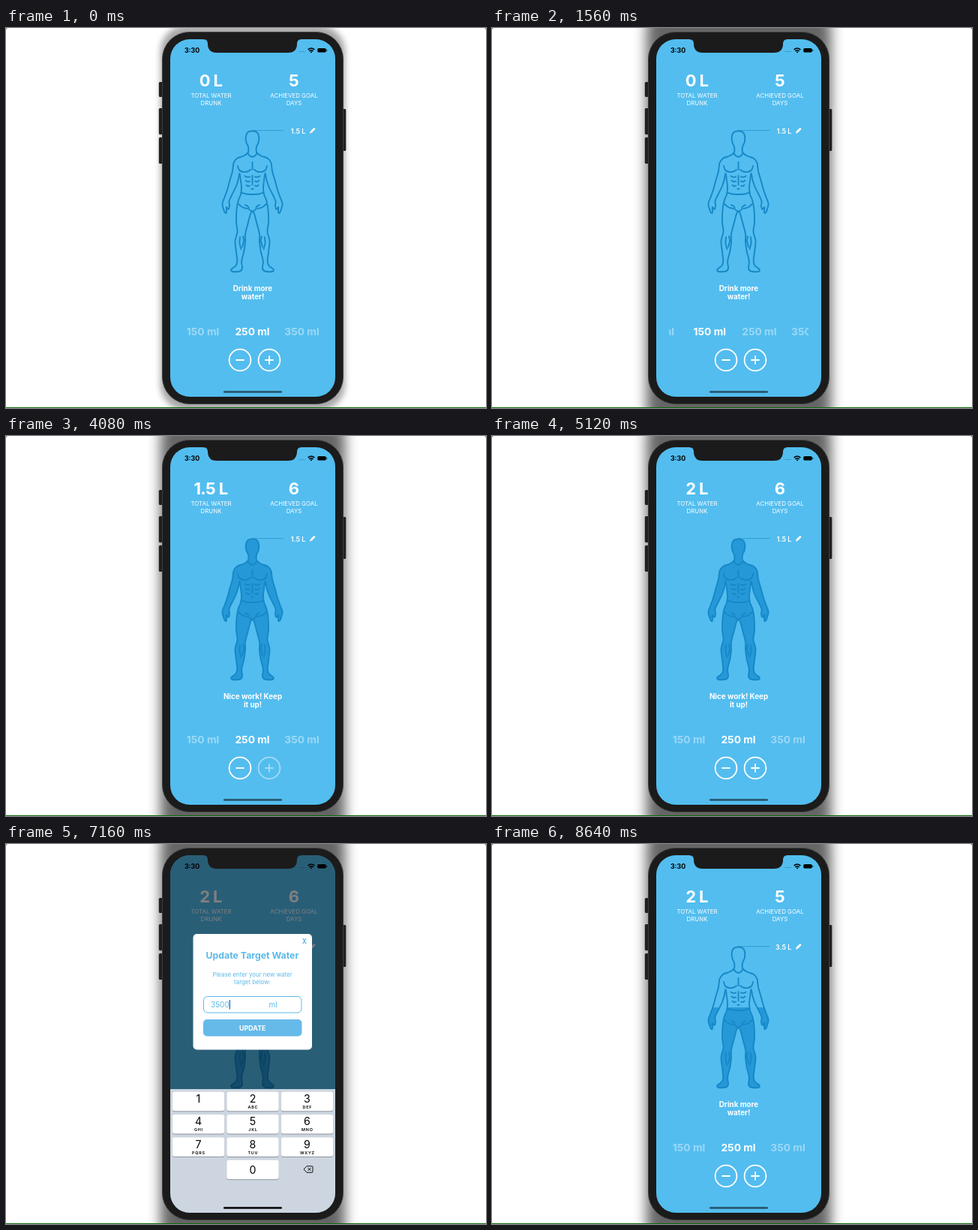
An HTML page that plays this animation: 640 px wide and 507 px high, repeating every 8.68 s.

```html
<!DOCTYPE html>
<html lang="en">
<head>
<meta charset="utf-8">
<title>Water tracker</title>
<style>
  html, body { margin: 0; height: 100%; overflow: hidden; background: #fff; }
  svg { display: block; width: 100vw; height: 100vh; }
  text { font-family: Inter, Roboto, sans-serif; text-anchor: middle; white-space: pre; }
</style>
</head>
<body>
<svg id="stage" viewBox="0 0 640 507"></svg>
<script>
const LOOP = 8680, BLUE = '#53bdef', INK = '#1688c6', SKY = '#5cb9e8';
const AXIS = 328.5, HEAD_Y = 137, FOOT_Y = 326;
const TAPS = Array.from({ length: 8 }, (_, i) => 2300 + 330 * i);
const UPDATE = 7500;
const TYPED = [6200, 6450, 6700, 6950];

const clamp = v => Math.max(0, Math.min(1, v));
const ramp = (t, start, length) => clamp((t - start) / length);
const smooth = u => u * u * (3 - 2 * u);
const easeOut = u => 1 - (1 - u) ** 2;
const dip = (t, start, end) => 1 - .8 * ramp(t, start, 60) * (1 - ramp(t, end, 90));

const label = (x, y, size, str, weight = 400, more = '') =>
  `<text x="${x}" y="${y}" font-size="${size}" font-weight="${weight}" ${more}>${str}</text>`;
const box = (x, y, w, h, r, fill, more = '') =>
  `<rect x="${x}" y="${y}" width="${w}" height="${h}" rx="${r}" fill="${fill}" ${more}/>`;

// Smooth curve through points written as "x,y x,y ..."
const parse = str => str.split(' ').map(p => p.split(',').map(Number));
function curve(pts) {
  let d = `M${pts[0]}`;
  for (let i = 0; i < pts.length - 1; i++) {
    const a = pts[i - 1] || pts[i], b = pts[i], c = pts[i + 1], e = pts[i + 2] || c;
    const k = j => [b[j] + (c[j] - a[j]) / 6, c[j] - (e[j] - b[j]) / 6];
    const [x1, x2] = k(0), [y1, y2] = k(1);
    d += `C${x1} ${y1} ${x2} ${y2} ${c}`;
  }
  return d;
}

const half = parse('328.5,137.3 322.5,139 319.8,145 320.5,153 323,158.5 322.8,166 317,170.5 308,174 ' +
  '303.5,180 302,191 298.5,203 295,216 291,227 288.5,234 289.5,240 292,246.5 294,246 293.8,239 296.5,242 ' +
  '298,237 297.5,231 301,223 306.5,212 309.5,203 311.5,194 313,204 314,213 313,222 309.5,231 ' +
  '307.5,243 307,259 308.5,272 305.5,284 307,299 308.3,311 306.5,317 300.5,322 302,325 ' +
  '312,324.5 315,320.5 314.2,311 317.5,297 319,285 319,275 322.5,261 326,248 328.5,245');
const mirrored = half.slice(0, -1).reverse().map(([x, y]) => [2 * AXIS - x, y]);
const outline = curve(half.concat(mirrored));

const details = [
  '322.5,167 325,170.5 328.5,172',
  '309,184 311,189.5 316,192 322,191.5 326,189',
  '318.5,197.5 321,198.8 325,198.5',
  '319.5,203.5 322,205 325,204.5',
  '320.5,209.5 322.5,211 325,210.5',
  '313.5,219.5 320,221.5 328.5,222',
  '309,234 315,239 321.5,241',
  '319,236 323,238.5 324,242 328.5,245',
  '312,279 311.5,287 313.5,295',
  '316,278 317,284 315,292'
].map(s => `<path d="${curve(parse(s))}"/>`).join('');

const figure = `
  <path d="${outline}" fill="#2598d8" clip-path="url(#level)"/>
  <g fill="none" stroke="${INK}" stroke-width="1.9" stroke-linecap="round" stroke-linejoin="round">
    <path d="${outline}"/>
    <g id="marks">${details}</g>
    <use href="#marks" transform="translate(${2 * AXIS}) scale(-1 1)"/>
    <path d="M328.5 179V189M328.5 197V209M327.5 214.8H329.5"/>
  </g>`;

const letters = ['', 'ABC', 'DEF', 'GHI', 'JKL', 'MNO', 'PQRS', 'TUV', 'WXYZ'];
function key(digit, col, row) {
  const x = 221.8 + 72.5 * col, y = 330.8 + 30.3 * row, mid = x + 34.7;
  return box(x, y + 1, 69.4, 25.5, 3, '#8d949d') + box(x, y, 69.4, 25.5, 3, '#fff') +
    label(mid, y + (digit ? 14.3 : 17.8), 14.2, digit) +
    (digit > 1 ? label(mid + .4, y + 22.3, 5.4, letters[digit - 1], 600, 'letter-spacing=".8"') : '');
}
const keyboard = box(219, 327, 220, 200, 0, '#cdd6e0') +
  letters.map((_, i) => key(i + 1, i % 3, Math.floor(i / 3))).join('') + key(0, 1, 3) +
  `<path d="M397 434L401 429.8H408Q409 429.8 409 431V437Q409 438.3 408 438.3H401ZM402.5 432L406.5 436M406.5 432L402.5 436"
    fill="none" stroke="#111" stroke-width="1"/>`;

const modal = box(249.5, 120, 158.5, 154.5, 5, '#fff') + `<g fill="${SKY}">` +
  label(398, 133.2, 8.6, 'X', 700) +
  label(328.5, 153, 12.3, 'Update Target Water', 700) +
  label(328.5, 177.2, 7.9, 'Please enter your new water') +
  label(328.5, 187.2, 7.9, 'target below:') +
  box(263.5, 203.5, 130.5, 21.5, 5, 'none', `stroke="${SKY}"`) +
  label(273, 218, 10, '', 400, 'id="field" style="text-anchor:start"') +
  label(356, 218, 10, 'ml') + '</g>' +
  box(273, 208, 1.3, 12.5, 0, '#3c5fce', 'id="caret"') +
  `<g id="update">${box(263, 234, 131.5, 22.5, 5, '#66bae9')}
    ${label(328.8, 248.5, 8.9, 'UPDATE', 700, 'fill="#fff"')}</g>`;

const big = 'letter-spacing="-.6"';
const choices = [50, 150, 250, 350, 450].map((ml, i) =>
  label(AXIS + 66 * (i - 2), 409.6, 13.8, ml + ' ml', 700, 'class="choice"')).join('');

const app = box(219, 15, 220, 477, 0, BLUE) + `<g fill="#fff">` +
  label(273, 77.8, 22, '', 700, `id="total" ${big}`) +
  label(383.5, 77.8, 22, '', 700, `id="days" ${big}`) +
  label(273.5, 93.2, 7.9, 'TOTAL WATER') + label(273.5, 103, 7.9, 'DRUNK') +
  label(384, 93.2, 7.9, 'ACHIEVED GOAL') + label(384, 103, 7.9, 'DAYS') +
  label(399.3, 140.6, 9, '', 600, 'id="goal" style="text-anchor:end"') +
  `<path id="pencil" d="M404.8 140.8L406 137.6L410.2 133.4Q411.3 132.8 412.2 134.2L412.4 135L408 139.4Z"/>` +
  label(329, 350.5, 9.8, '', 700, 'id="line1"') + label(329, 362, 9.8, '', 700, 'id="line2"') +
  `<g clip-path="url(#picker)"><g id="strip">${choices}</g></g></g>
  <path d="M328 136.7H370" stroke="#2d9ad2" stroke-width=".9"/>${figure}
  <g fill="none" stroke="#fff" stroke-width="1.8">
    <circle cx="312" cy="443" r="14.4"/><path d="M306.3 443H317.7"/>
    <g id="plus"><circle cx="351" cy="443" r="14.4"/><path d="M345.3 443H356.7M351 437.3V448.7"/></g>
  </g>`;

const status = label(248, 33, 8.8, '3:30', 700) +
  `<path d="M391 31.5H399" stroke="#2b7ba3" stroke-width="1" stroke-dasharray="1.2 1.2"/>
  <g fill="none" stroke="#000" stroke-width="1.5">
    <path d="M402.6 28.9Q407 25.2 411.4 28.9M404.3 31Q407 28.6 409.7 31"/></g>
  <circle cx="407" cy="32.3" r="1"/>` +
  box(415.3, 27, 11.4, 5.6, 1.5, '#000') + box(427.3, 28.7, .9, 2.2, .4, '#000');

const button = (x, y, h) => box(x, y, 5, h, 1.5, '#202020');

stage.innerHTML = `
  <defs>
    <filter id="blur" x="-30%" y="-30%" width="160%" height="160%"><feGaussianBlur stdDeviation="8.5"/></filter>
    <filter id="thin" x="-30%" y="-30%" width="160%" height="160%"><feGaussianBlur stdDeviation="4"/></filter>
    <clipPath id="screen">${box(219, 15, 220, 477, 26, '#000')}</clipPath>
    <clipPath id="picker">${box(236, 390, 186, 30, 0, '#000')}</clipPath>
    <clipPath id="level">${box(270, 326, 120, 200, 0, '#000', 'id="water"')}</clipPath>
  </defs>
  ${box(206, -20, 246, 550, 20, '#000', 'id="wide" opacity=".6" filter="url(#blur)"')}
  ${box(206, -3, 246, 513, 34, '#000', 'id="faint" opacity=".35" filter="url(#thin)"')}
  ${button(203.8, 72, 20)}${button(203.8, 107, 35)}${button(203.8, 146, 35)}${button(448.3, 108, 56)}
  ${box(208.5, 5.5, 241, 496, 36, '#1b1b1b', 'stroke="#3d3d3d"')}
  <g clip-path="url(#screen)">${app}
    ${status}
    ${box(219, 15, 220, 477, 0, '#000', 'id="shade"')}
    <g id="modal">${modal}</g>
    <g id="keys">${keyboard}</g>
    ${box(290, 484.3, 78, 2.5, 1.2, '#000', 'id="home"')}
  </g>
  <path d="M263 14V15Q269 15 269 21Q269 33 281 33H376Q388 33 388 21Q388 15 394 15V14Z" fill="#1b1b1b"/>
  <path d="M0 506.5H640" stroke="#0b6b0b"/>
  <path d="M0 0H2L0 2ZM640 0H638L640 2Z" fill="#888"/>`;

const $ = id => document.getElementById(id);
const fade = (id, v) => $(id).setAttribute('opacity', v);
const write = (id, str) => { if ($(id).textContent !== str) $(id).textContent = str; };
const choiceNodes = [...document.querySelectorAll('.choice')];

function draw(t) {
  fade('wide', t < 40 ? 0 : .6);
  fade('faint', t < 40 ? .35 : 0);

  const shift = 66 * (smooth(ramp(t, 1400, 360)) - smooth(ramp(t, 1880, 300)));
  const active = shift > (t < 1880 ? 11 : 55) ? 1 : 2;
  $('strip').setAttribute('transform', `translate(${shift})`);
  choiceNodes.forEach((node, i) => node.setAttribute('opacity', i === active ? 1 : .42));

  const taps = TAPS.filter(time => t >= time).length;
  const updated = t >= UPDATE, done = taps >= 6 && !updated;
  write('total', taps / 4 + ' L');
  write('days', done ? '6' : '5');
  write('goal', updated ? '3.5 L' : '1.5 L');
  write('line1', done ? 'Nice work! Keep' : 'Drink more');
  write('line2', done ? 'it up!' : 'water!');
  fade('plus', Math.min(...TAPS.map(time => dip(t, time - 240, time))));
  fade('pencil', dip(t, 5380, 5500));

  const poured = TAPS.slice(0, 6).reduce((sum, time) => sum + smooth(ramp(t, time, 150)), 0) / 6;
  const level = poured + (2 / 3.5 - 1) * smooth(ramp(t, UPDATE, 250));
  $('water').setAttribute('y', FOOT_Y - (FOOT_Y - HEAD_Y) * level);

  const shown = smooth(ramp(t, 5500, 280)) - smooth(ramp(t, UPDATE + 30, 230));
  fade('shade', shown * .5);
  fade('modal', shown);
  fade('update', dip(t, 7370, UPDATE));
  const typed = TYPED.filter(time => t >= time).length;
  write('field', '3500'.slice(0, typed));
  $('caret').setAttribute('x', 273 + (typed ? $('field').getComputedTextLength() : 0));

  const raised = easeOut(ramp(t, 5600, 290)) - easeOut(ramp(t, 7780, 290));
  $('keys').setAttribute('transform', `translate(0 ${166 * (1 - raised)})`);
  fade('home', .58 + .42 * raised);
}

function frame() {
  draw(performance.now() % LOOP);
  requestAnimationFrame(frame);
}
frame();
</script>
</body>
</html>
```
